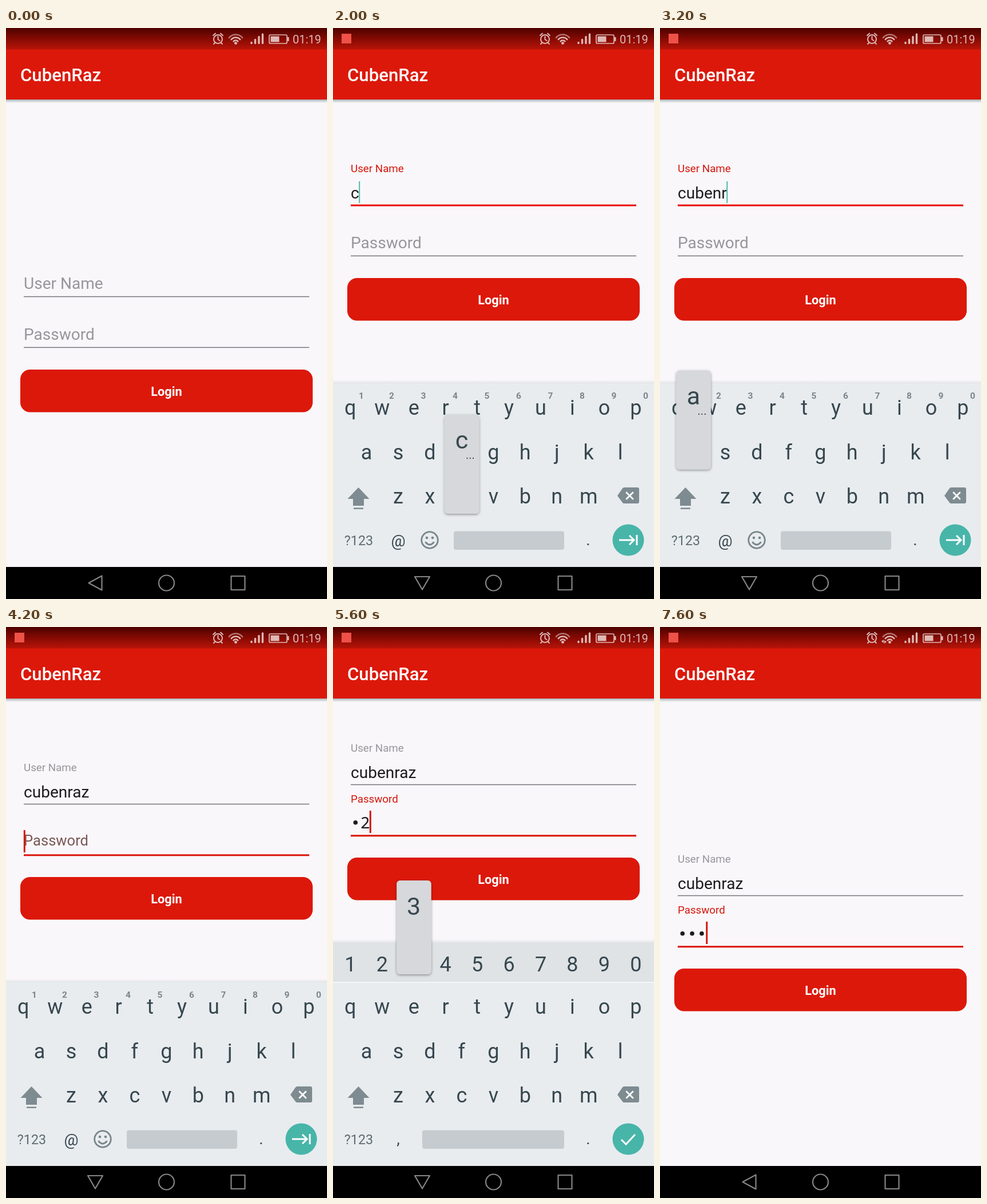
These frames come from a looping animation (561x998 px, 8 s). An HTML page:

```html
<!DOCTYPE html>
<html lang="en">
<head>
<meta charset="utf-8">
<title>Login form</title>
<style>
  html, body { margin: 0; width: 100%; height: 100%; overflow: hidden; background: #f9f7fa; }
  svg { display: block; width: 561px; height: 998px; font-family: Roboto, sans-serif; }
  .mid { text-anchor: middle; }
  .title { font-size: 31.17px; font-weight: 500; fill: #fff; }
  .button { font-size: 21.8px; font-weight: 700; fill: #fff; }
  .value { font-size: 28.05px; fill: #1d1b1e; }
  .mono { font-family: "Noto Sans Mono", monospace; }
  .key { font-size: 36px; fill: #37474f; text-anchor: middle; }
  .alt { font-size: 15.5px; font-weight: 700; fill: #7b858b; text-anchor: middle; }
  .big { font-size: 43px; fill: #37474f; text-anchor: middle; }
  .line { fill: none; stroke-linecap: round; stroke-linejoin: round; }
  .status { fill: #dfb9b5; stroke: #dfb9b5; }
  .nav { fill: none; stroke: #858585; stroke-width: 2.2; stroke-linejoin: round; }
</style>
</head>
<body>
<svg viewBox="0 0 561 998">
  <defs>
    <linearGradient id="bar" x2="0" y2="1">
      <stop stop-color="#4c0200"/><stop offset=".5" stop-color="#850a03"/><stop offset="1" stop-color="#b81409"/>
    </linearGradient>
    <linearGradient id="drop" x2="0" y2="1">
      <stop stop-color="#7f9297" stop-opacity=".65"/><stop offset="1" stop-color="#7f9297" stop-opacity="0"/>
    </linearGradient>
    <linearGradient id="rise" x2="0" y2="1">
      <stop stop-color="#808890" stop-opacity="0"/><stop offset="1" stop-color="#808890" stop-opacity=".18"/>
    </linearGradient>
    <filter id="soft" x="-20%" y="-10%" width="140%" height="120%">
      <feDropShadow dx="0" dy="1.5" stdDeviation="2" flood-color="#000" flood-opacity=".4"/>
    </filter>
  </defs>
  <rect width="561" height="998" fill="#f9f7fa"/>
  <g id="form"></g>
  <rect y="37" width="561" height="88" fill="#dc180a"/>
  <rect y="125" width="561" height="6" fill="url(#drop)"/>
  <text class="title" x="25" y="93">CubenRaz</text>

  <rect width="561" height="37.5" fill="url(#bar)"/>
  <rect id="badge" x="15" y="10" width="17" height="17" fill="#ee5148"/>
  <g class="status">
    <g class="line" stroke-width="2">
      <circle cx="370.500" cy="19.500" r="7.500"/>
      <path d="M370.500 15v5l3 2M362 13l4-3.500M379 13l-4-3.500M365 26l-2 2M376 26l2 2"/>
    </g>
    <g id="wifi" class="line" stroke-width="2.600" stroke-linecap="butt"></g>
    <path id="traffic" stroke="none" d="M387 25l4-3v6zM396 26l-4-3v6z"/>
    <path class="line" stroke-width="3.400" d="M429 25.500v1M435.500 20.500v6M442 15.500v11M448.500 11v15.500"/>
    <rect x="460" y="12" width="31" height="15" rx="2" fill="none" stroke-width="1.700"/>
    <path stroke="none" d="M462.500 14.500h15v10h-15zM492 16h2.500v7h-2.500z"/>
    <text x="501" y="26.500" font-size="20" stroke="none">01:19</text>
  </g>

  <g id="board"></g>
  <g id="popup"></g>
  <rect y="942" width="561" height="56"/>
  <rect id="press" x="135" y="942" width="42" height="55" rx="20" fill="#383838"/>
  <g class="nav">
    <path id="back"/>
    <circle cx="280.500" cy="970" r="13.500"/>
    <rect x="393.500" y="958" width="24" height="24"/>
  </g>
</svg>
<script>
const $ = id => document.getElementById(id);
const show = (id, on) => $(id).setAttribute('visibility', on ? 'visible' : 'hidden');
const text = (cls, x, y, s, extra = '') => `<text class="${cls}" x="${x}" y="${y}" ${extra}>${s}</text>`;
const rect = (x, y, w, h, fill, extra = '') =>
  `<rect x="${x}" y="${y}" width="${w}" height="${h}" fill="${fill}" ${extra}/>`;

const LOOP = 8000, LEFT = 31, PITCH = 55.45;
const RED = '#d5170c', GREY = '#98969a', TEAL = '#4db9af';
const ROWS = [
  { keys: '1234567890', x: 30.3, y: 602 },
  { keys: 'qwertyuiop', x: 30.3, y: 676 },
  { keys: 'asdfghjkl', x: 58.5, y: 753.5 },
  { keys: 'zxcvbnm', x: 114, y: 831 }
];

// Each step changes part of the state from its time on.
const START = {
  badge: false, shift: 0, board: '', slide: 0, focus: '', caret: false,
  user: '', pass: '', userHint: 0, passHint: 0, popup: '', press: false, traffic: false
};
const STEPS = [
  [0, {}],
  [200, { badge: true }],
  [1000, { focus: 'user', caret: true, userHint: .5 }],
  [1200, { userHint: 1, shift: 160, board: 'text', slide: 80 }],
  [1400, { slide: 0 }],
  [2000, { user: 'c', popup: 'c' }],
  ...[...'ubenraz'].map((key, i) => [2200 + i * 200, { user: 'cubenraz'.slice(0, i + 1), popup: key }]),
  [3600, { user: 'cubenraz', popup: '' }],
  [4000, { caret: false }],
  [4200, { focus: 'pass', caret: true, passHint: .5 }],
  [4400, { passHint: 1, shift: 194, board: 'digits' }],
  [4800, { popup: '1' }],
  [5000, { pass: '1' }],
  [5200, { popup: '' }],
  [5400, { popup: '2' }],
  [5600, { pass: '•2', popup: '3' }],
  [5800, { pass: '••3', popup: '' }],
  [6200, { caret: false }],
  [6600, { caret: true, press: true }],
  [7000, { shift: 0, board: '', press: false }],
  [7200, { pass: '•••', caret: false, traffic: true }],
  [7600, { caret: true }]
];
let last = START;
const STATES = STEPS.map(([, change]) => last = { ...last, ...change });

function hint(label, phase, y, focused) {
  const [size, base, fill] = phase === 0 ? [28.05, y - 13.5, GREY]
    : phase < 1 ? [25.6, y - 16.3, '#7a5856']
    : [18.75, y - 57.3, focused ? RED : GREY];
  return text('', LEFT, base, label, `font-size="${size}" fill="${fill}"`);
}

function underline(y, focused, color) {
  return focused ? rect(LEFT, y - 1, 499, 3, color) : rect(LEFT, y - .7, 499, 1.5, '#77747a');
}

function password(value, y) {
  return [...value].map((c, i) => {
    const x = LEFT + i * 16.83;
    return c === '•' ? `<circle cx="${x + 8.3}" cy="${y - 10.2}" r="3.8" fill="#1d1b1e"/>`
      : text('value mono', x, y, c);
  }).join('');
}

function drawForm(s) {
  const inUser = s.focus === 'user', inPass = s.focus === 'pass';
  const form = $('form');
  form.setAttribute('transform', `translate(0 ${-s.shift})`);
  form.innerHTML =
    hint('User Name', s.userHint, 469.5, inUser) +
    text('value', LEFT, 458, s.user, 'id="name"') +
    underline(469.5, inUser, '#ec0b0b') +
    hint('Password', s.passHint, 558.3, inPass) +
    password(s.pass, 546) +
    underline(558.3, inPass, '#dc1208') +
    rect(25, 597, 511, 74.5, '#dc180a', 'rx="17"') +
    text('button mid', 280.5, 642.5, 'Login');
  if (!s.caret) return;
  form.innerHTML += inUser
    ? rect(LEFT + (s.user ? $('name').getComputedTextLength() : 0) - .5, 428, 2, 38, TEAL)
    : rect(LEFT + s.pass.length * 16.5 - .2, 515, 3, 39, RED);
}

function drawBoard(s) {
  const digits = s.board === 'digits';
  const top = digits ? 552 : 621;
  const rows = digits ? ROWS : ROWS.slice(1);
  const letters = rows.map(r => [...r.keys].map((k, i) => text('key', r.x + i * PITCH, r.y, k)).join('')).join('');
  const alts = digits ? '' : [...ROWS[0].keys].map((k, i) =>
    text('alt', 47 + i * 55.5 + (i ? 0 : 2.5), 648, k)).join('');
  const spaceX = digits ? 156 : 211;
  const extras = digits ? text('key', 114, 904, ',', 'style="font-size:28px"')
    : text('key', 114, 906, '@', 'style="font-size:28px"') +
      `<g class="line" stroke="#78858b" stroke-width="2.8"><circle cx="169" cy="895" r="14.3"/>
       <path d="M162 899q7 8 14 0"/></g><g fill="#78858b"><circle cx="164" cy="891" r="2.3"/><circle cx="174" cy="891" r="2.3"/></g>`;
  const action = digits ? 'M504 896l8 8 16-17' : 'M500 895h25M518 887l8 8-8 8M531 886v18';
  $('board').setAttribute('transform', `translate(0 ${s.slide})`);
  $('board').innerHTML = !s.board ? '' :
    rect(0, top - 6, 561, 6, 'url(#rise)') +
    rect(0, top, 561, 942 - top, '#e8ecef') +
    (digits ? rect(0, 552, 561, 69, '#dfe3e5') + rect(0, 620.5, 561, 1.5, '#fafbfb') : '') +
    letters + alts + extras +
    `<path fill="#7e8b91" d="M44.500 803l19 20h-9.500v12h-19v-12h-9.500zM36 838.500h17v2.500h-17z"/>
     <path fill="#7e8b91" d="M497 817.500l9-13q1-1.500 3-1.500h23q3 0 3 3v22q0 3-3 3h-23q-2 0-3-1.500z"/>
     <path class="line" stroke="#fff" stroke-width="2.800" d="M513 812l11 11M524 812l-11 11"/>` +
    text('mid', 45, 904, '?123', 'font-size="23.3" fill="#5f6c73"') +
    rect(spaceX, 879.5, 404 - spaceX, 32.5, '#c6cbcf', 'rx="4"') +
    text('key', 446, 904, '.', 'style="font-size:28px"') +
    '<circle cx="516" cy="895" r="27.500" fill="#48b5a9"/>' +
    `<path class="line" style="stroke-linecap:butt;stroke-linejoin:miter" stroke="#fff" stroke-width="3" d="${action}"/>`;
}

function drawPopup(key) {
  const row = key && ROWS.find(r => r.keys.includes(key));
  if (!row) return $('popup').innerHTML = '';
  const x = row.x + row.keys.indexOf(key) * PITCH;
  const digit = row === ROWS[0];
  $('popup').innerHTML =
    rect(x - 30, row.y - (digit ? 159 : 155), 60.5, digit ? 164 : 173, '#d6d8db', 'rx="6" filter="url(#soft)"') +
    text('big', x, row.y - (digit ? 99 : 96), key) +
    (digit || key === 'b' ? '' : text('mid', x + 15, row.y - 78, '...', 'font-size="20" fill="#37474f"'));
}

function draw(s) {
  drawForm(s);
  drawBoard(s);
  drawPopup(s.popup);
  for (const id of ['badge', 'press', 'traffic']) show(id, s[id]);
  $('back').setAttribute('d', s.board ? 'M143 959h26l-13 22.500z' : 'M144.500 970l23-12.500v25z');
}

// Fan of arcs over a dot
$('wifi').innerHTML = [15, 10, 5].map((r, i) => {
  const w = r * .77, h = r * .64;
  return `<path opacity="${i ? 1 : .6}" d="M${401.5 - w} ${26.5 - h}A${r} ${r} 0 0 1 ${401.5 + w} ${26.5 - h}"/>`;
}).join('') + '<circle cx="401.5" cy="26.5" r="1.2"/>';

let shown = -1;
const begin = performance.now();
function tick() {
  const t = Math.max(0, performance.now() - begin) % LOOP;
  const now = STEPS.filter(([at]) => at <= t).length - 1;
  if (now !== shown) draw(STATES[shown = now]);
  requestAnimationFrame(tick);
}
tick();
</script>
</body>
</html>
```
